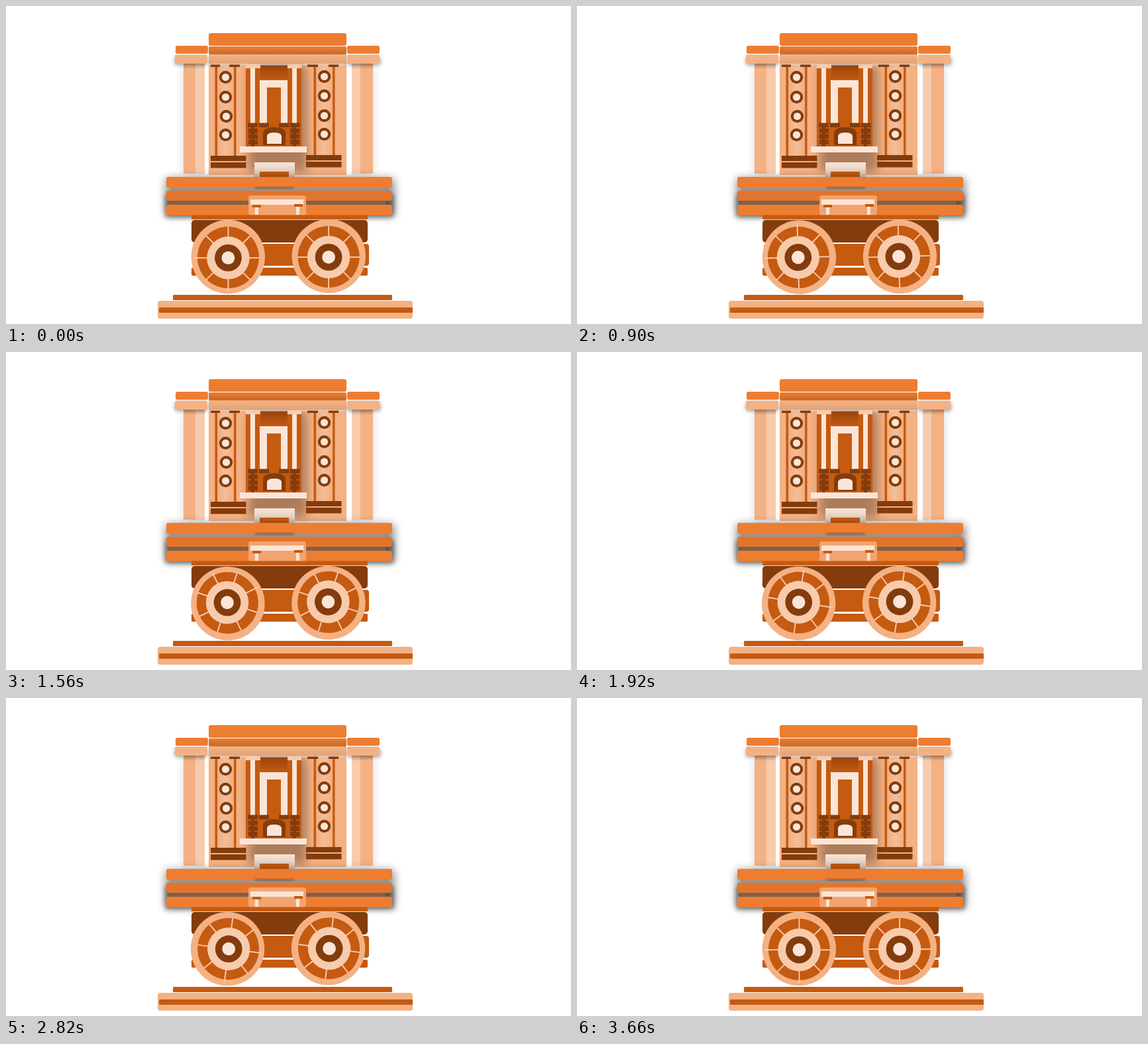
These frames come from a looping animation (853x480 px, 3.72 s). An HTML page:

```html
<!DOCTYPE html>
<html lang="en">
<head>
<meta charset="utf-8">
<title>Wooden wagon</title>
<style>
html, body { margin: 0; width: 100%; height: 100%; overflow: hidden; background: #fff; }
svg { display: block; width: 853px; height: 480px; }
</style>
</head>
<body>
<svg id="stage" viewBox="0 0 853 480" xmlns="http://www.w3.org/2000/svg">
  <defs>
    <filter id="soft" x="-50%" y="-50%" width="200%" height="200%"><feGaussianBlur stdDeviation="3"/></filter>
    <filter id="wide" x="-50%" y="-50%" width="200%" height="200%"><feGaussianBlur stdDeviation="7"/></filter>
    <linearGradient id="fadeDown" x1="0" y1="0" x2="0" y2="1">
      <stop offset="0" stop-color="#000" stop-opacity=".25"/><stop offset="1" stop-color="#000" stop-opacity="0"/>
    </linearGradient>
    <linearGradient id="fadeUp" x1="0" y1="1" x2="0" y2="0">
      <stop offset="0" stop-color="#000" stop-opacity=".16"/><stop offset="1" stop-color="#000" stop-opacity="0"/>
    </linearGradient>
    <linearGradient id="post">
      <stop offset="0" stop-color="#eda97b"/><stop offset=".5" stop-color="#f6bd97"/><stop offset="1" stop-color="#eda97b"/>
    </linearGradient>
    <clipPath id="room"><rect x="306" y="73" width="208" height="185"/></clipPath>
  </defs>
</svg>
<script>
const stage = document.getElementById('stage');
const ORANGE = '#ed7d31', TAN = '#f4b183', PEACH = '#f8cbad', CREAM = '#fbe5d6', RUST = '#c55a11', DARK = '#843c0c';
let layer = stage;

function add(tag, attrs) {
  const el = document.createElementNS('http://www.w3.org/2000/svg', tag);
  for (const k in attrs) el.setAttribute(k, attrs[k]);
  return layer.appendChild(el);
}
// Box from its left, top, right and bottom edges
function box(x1, y1, x2, y2, fill, rx = 0, more = {}) {
  return add('rect', { x: x1, y: y1, width: x2 - x1, height: y2 - y1, rx, fill, ...more });
}
function disc(cx, cy, r, fill) { return add('circle', { cx, cy, r, fill }); }
function shade(x1, y1, x2, y2, opacity, filter = 'soft') {
  box(x1, y1, x2, y2, '#000', 2, { opacity, filter: `url(#${filter})` });
}
function group(attrs, draw) {
  const parent = layer, g = add('g', attrs);
  layer = g;
  draw();
  layer = parent;
  return g;
}

function drawRoof() {
  shade(255, 77, 304, 89, .4);
  shade(515, 77, 565, 89, .4);
  box(306, 41, 514, 60, ORANGE, 3);
  box(306, 61, 514, 73, ORANGE, 2);
  box(306, 61, 514, 73, 'url(#fadeUp)', 2);
  for (const x of [256, 515]) box(x, 60, x + 49, 72, ORANGE, 2.5);
  for (const x of [255, 515]) box(x, 73.5, x + 49, 87, TAN, 2);
}

function drawWalls() {
  shade(268, 92, 554, 254, .16, 'wide');
  box(268, 87, 286, 253, TAN);
  box(286, 87, 300, 253, PEACH);
  box(300, 87, 306, 255, '#fff');
  box(514, 87, 522, 255, '#fff');
  box(522, 87, 535, 253, PEACH);
  box(535, 87, 554, 253, TAN);
  for (const x of [268, 522]) box(x, 87, x + 32, 95, 'url(#fadeDown)', 0, { opacity: .4 });
  box(306, 73, 514, 255, TAN);
}

function drawTower(x, y, base, dots) {
  box(x, 91, x + 32, 226, 'url(#post)');
  box(x, 91, x + 3.6, 226, RUST);
  box(x + 28.6, 91, x + 32, 226, RUST);
  for (const [dx, dy] of dots) {
    disc(dx, dy, 9.7, DARK);
    disc(dx, dy, 5.6, CREAM);
  }
  box(base, y, base + 53.5, y + 8, DARK);
  box(base, y + 10, base + 53.5, y + 18.5, DARK);
}

function drawRoom() {
  group({ 'clip-path': 'url(#room)' }, () => {
    shade(366, 92, 454, 250, .29, 'wide');
    shade(375, 80, 444, 96, .17, 'wide');
  });
  box(306, 87, 514, 90, '#d9d4d1', 0, { opacity: .55 });
  drawTower(315.5, 226, 309, [[331.5, 107.5], [331.5, 137.5], [332.5, 166.5], [331.5, 194.5]]);
  drawTower(464.5, 225, 453, [[480.5, 106.5], [480.5, 135.5], [480.5, 165.5], [480.5, 193.5]]);
  for (const [x, w] of [[309, 14], [337, 16], [455, 16], [487, 15]]) box(x, 88.5, x + w, 92, DARK);
}

function drawHearth() {
  box(362, 90, 446, 212, RUST);
  box(384, 89, 425, 112, 'url(#fadeDown)');
  box(369, 94, 376, 177, CREAM);
  box(432, 94, 439, 177, CREAM);
  box(383, 112, 425, 177, CREAM);
  box(394, 123, 415, 178, RUST);
  box(362, 88, 384, 94, PEACH);
  box(425, 88, 446, 94, PEACH);
  for (const x of [365, 382, 412, 428.5]) box(x, 176.5, x + 15, 183, DARK);
  for (const x of [366, 429]) {
    for (const y of [185, 193.5, 202]) box(x, y, x + 14, y + 7, DARK);
    box(x + 4, 183, x + 9, 212, DARK);
  }
  add('path', { d: 'M388 210V191Q390 183 405 183Q420 183 422 191V210Z', fill: DARK });
  add('path', { d: 'M394 208V196Q395 191 405 191Q415 191 416 196V208Z', fill: CREAM });
  box(353, 212, 454, 221, CREAM);
  box(375, 236, 436, 258, CREAM);
  box(375, 236, 436, 258, 'url(#fadeUp)');
  box(383, 250, 427, 258, RUST);
}

function drawDeck() {
  shade(241, 260, 586, 317, .45, 'wide');
  shade(240, 284, 586, 319, .4);
  box(248, 274, 573, 279, '#a78f80');
  box(248, 294, 573, 300, '#80604c');
  box(242, 258, 583, 274, ORANGE, 3);
  box(242, 279, 583, 294, '#e2752b', 3);
  box(242, 300, 583, 316, ORANGE, 3);
  group({ 'clip-path': 'inset(0)' }, () => shade(375, 272, 436, 277, .3));
  box(366, 286, 453, 316, '#f2a470', 4);
  box(369, 292, 449, 300, CREAM);
  box(376, 303, 381, 315, CREAM);
  box(438, 302, 443, 315, CREAM);
  box(372, 300, 385, 304, RUST);
  box(435, 299, 448, 303, RUST);
}

function drawBase() {
  box(280, 315.5, 546, 322, RUST);
  box(280, 323, 546, 357, DARK, 5);
  box(282, 359, 548, 392, RUST, 4);
  box(280, 395, 546, 407, RUST, 2);
  box(252, 436, 583, 444, RUST, 1.5);
  box(229, 445, 614, 472, TAN, 4);
  box(231, 455, 614, 463, RUST, 1.5);
}

// The rim and hub sit a little off the pivot, so the wheel wobbles as it turns
function makeWheel(x, y, hub, reach) {
  const [hx, hy] = hub;
  const g = group({}, () => {
    disc(.3, -.5, 55.7, TAN);
    disc(hx, hy - .6, 46.5, RUST);
    for (let i = 0; i < 8; i++) {
      const a = i * Math.PI / 4, c = Math.cos(a), s = Math.sin(a);
      const far = reach[i] || 47;
      add('line', { x1: hx + 30 * c, y1: hy + 30 * s, x2: hx + far * c, y2: hy + far * s,
        stroke: PEACH, 'stroke-width': 1.9 });
    }
    disc(hx, hy, 32.2, PEACH);
    disc(hx, hy, 20.4, DARK);
    disc(hx, hy, 9.9, CREAM);
  });
  return deg => g.setAttribute('transform', `translate(${x} ${y}) rotate(${deg})`);
}

drawWalls();
drawRoom();
drawRoof();
box(306, 73, 514, 87, TAN);
box(306, 73, 514, 87, 'url(#fadeUp)', 0, { opacity: .5 });
drawHearth();
drawDeck();
drawBase();
const wheels = [
  makeWheel(335, 379, [.45, 1.2], { 2: 50, 4: 52 }),
  makeWheel(487, 378, [.1, 1.1], {}),
];

const LOOP = 3720, STEP = 60, TURN = 3660;
let start = null;

function render(t) {
  const at = Math.floor((t % LOOP) / STEP) * STEP;
  for (const spin of wheels) spin(at / TURN * 360);
}
function tick(now) {
  if (start === null) start = now;
  render(Math.max(0, now - start));
  requestAnimationFrame(tick);
}
render(0);
requestAnimationFrame(tick);
</script>
</body>
</html>
```
